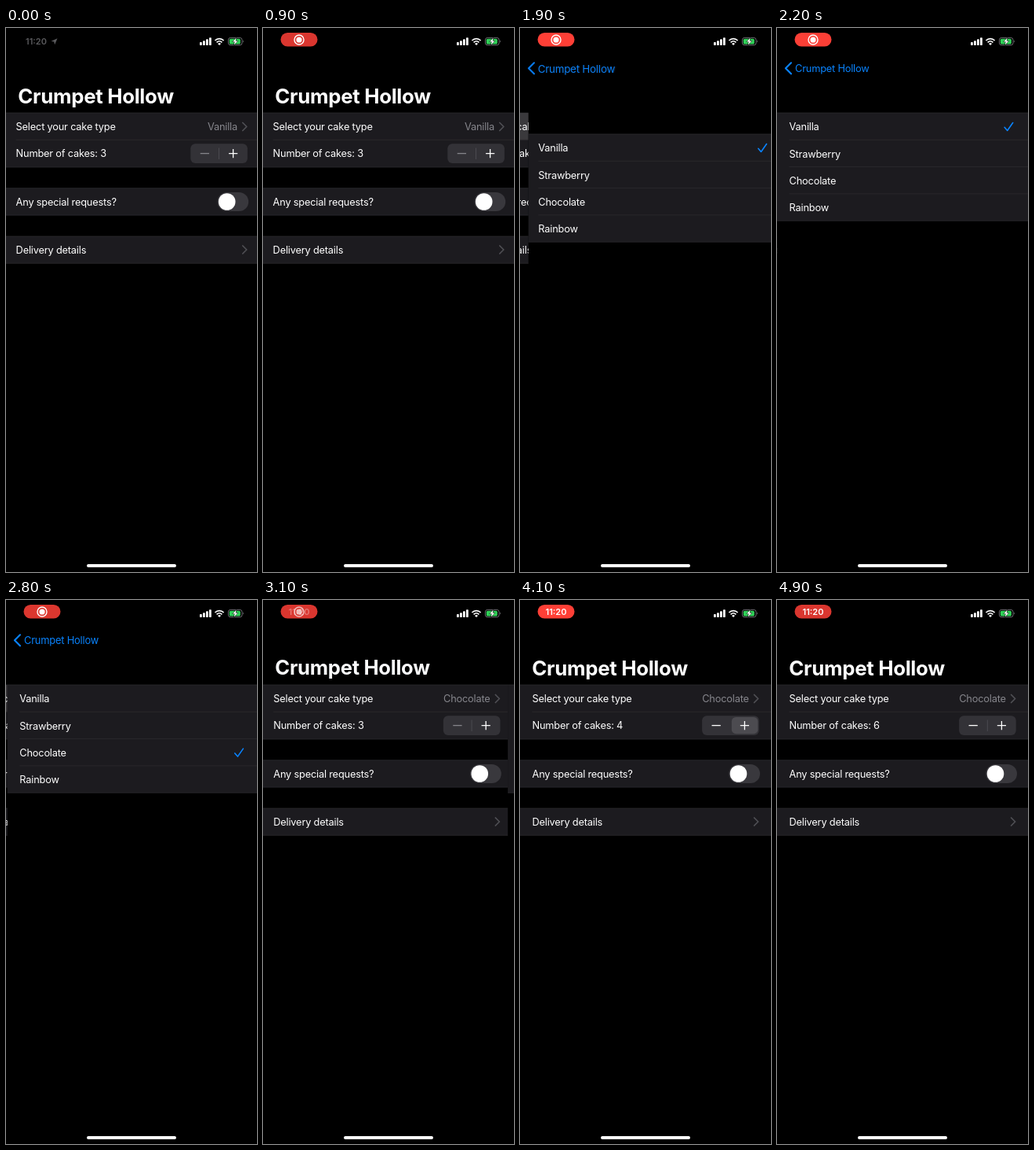
Animation of 320 by 692 pixels, one loop 5 s. Source, as an HTML page:

```html
<!DOCTYPE html>
<html lang="en">
<head>
<meta charset="utf-8">
<title>Cake order</title>
<style>
  html, body { margin: 0; width: 100%; height: 100%; overflow: hidden; background: #000; }
  svg { display: block; width: 100vw; height: 100vh; }
  text { font: 400 12.8px Inter, "Liberation Sans", sans-serif; letter-spacing: -.2px; fill: #fff; }
  .card { fill: #1c1b1f; }
  .line { stroke: #2c2b2f; stroke-width: .8; }
  .lit { fill: #3a393c; }
  .grey { fill: #86868c; }
  .chev { fill: none; stroke: #4f4f54; stroke-width: 1.7; stroke-linecap: round; stroke-linejoin: round; }
  .blue { fill: none; stroke: #0a84ff; stroke-linecap: round; stroke-linejoin: round; }
  #big { font-size: 25.8px; font-weight: 700; letter-spacing: -.3px; }
  #small { fill: #0a84ff; }
  .clock { font-size: 11px; font-weight: 600; letter-spacing: 0; text-anchor: middle; }
</style>
</head>
<body>
<svg viewBox="0 0 320 692" preserveAspectRatio="none">
  <rect width="320" height="692"/>

  <g id="main">
    <g id="cards"></g>
    <rect id="rowLit" class="lit" y="108" width="320" height="34.3"/>
    <g id="left">
      <path class="line" d="M0 142.3H340"/>
      <text y="130.2">Select your cake type</text>
      <text id="count" y="164.4"></text>
      <text y="225.7">Any special requests?</text>
      <text y="287">Delivery details</text>
    </g>
    <g id="right">
      <text id="cake" class="grey" x="295" y="130.2" text-anchor="end"></text>
      <path class="chev" d="M301.8 120.5l5 5-5 5M301.8 277l5 5-5 5"/>
      <rect x="235.3" y="147.3" width="72.6" height="24.6" rx="6" fill="#333237"/>
      <rect id="press" x="273" y="149" width="33.5" height="21.2" rx="5.5" fill="#4c4b50"/>
      <path id="divider" d="M271.5 152.5V167" stroke="#4b4a50" stroke-width="1"/>
      <path id="minus" d="M247.7 159.6H259" stroke-width="1.3"/>
      <path d="M284 159.6H295.2M289.6 154V165.2" stroke="#fff" stroke-width="1.3"/>
      <rect x="269.5" y="208.9" width="39.7" height="24.2" rx="12.1" fill="#39383d"/>
      <circle cx="281.7" cy="221" r="10.8" fill="#fff"/>
    </g>
  </g>

  <g id="picker">
    <rect y="95" width="320" height="597"/>
    <g id="list">
      <rect class="card" y="108" width="320" height="137.2"/>
      <path class="line" d="M0 108H320M0 245.2H320"/>
      <rect id="optionLit" class="lit" y="176.6" width="320" height="34.3"/>
      <g id="options"></g>
      <path id="check" class="blue" stroke-width="1.6" d="M290 126.3l3.6 4.2 7-10"/>
    </g>
  </g>

  <path id="back" class="blue" stroke-width="2.2" d="M18 44.3l-7 7 7 7"/>
  <text id="big">Crumpet Hollow</text>
  <text id="small">Crumpet Hollow</text>

  <g id="idle" fill="#5a5a5d">
    <text class="clock" x="38.5" y="21.2" style="fill:#5a5a5d">11:20</text>
    <path d="M65.5 13.2l-3.4 8-.9-3.6-3.6-.9z"/>
  </g>
  <g id="pill">
    <rect id="red" x="22.5" y="6" width="47" height="17.6" rx="8.8" fill="#ff4037"/>
    <text id="time" class="clock" x="46" y="18.9">11:20</text>
    <g id="rec">
      <circle cx="46" cy="15" r="6" fill="none" stroke="#fff" stroke-width="1.4"/>
      <circle cx="46" cy="15" r="3.6" fill="#fff"/>
    </g>
  </g>

  <g fill="#fff">
    <rect x="247" y="18" width="2.8" height="4" rx=".7"/>
    <rect x="251" y="16.3" width="2.8" height="5.7" rx=".7"/>
    <rect x="255" y="14.3" width="2.8" height="7.7" rx=".7"/>
    <rect x="259" y="12.2" width="2.8" height="9.8" rx=".7"/>
    <path d="M272 22l-2-2.1a2.9 2.9 0 0 1 4 0z"/>
    <path d="M268.6 18.3a4.9 4.9 0 0 1 6.8 0M266.4 16a8 8 0 0 1 11.2 0"
      fill="none" stroke="#fff" stroke-width="1.7"/>
  </g>
  <rect x="283.4" y="12.4" width="17.6" height="9.4" rx="2.8" fill="none" stroke="#77777b" stroke-width=".9"/>
  <path d="M302.3 15.6a1.8 1.8 0 0 1 0 3z" fill="#77777b"/>
  <rect x="284.8" y="13.8" width="14" height="6.6" rx="1.5" fill="#30d158"/>
  <path d="M293.6 12.6l-4.6 5h2.7l-1 4 4.8-5.2h-2.8z" fill="#fff" stroke="#000" paint-order="stroke"/>
  <rect x="103" y="682" width="114" height="4" rx="2" fill="#fff"/>
</svg>
<script>
const el = {};
document.querySelectorAll('[id]').forEach(e => el[e.id] = e);
const ROW = 34.3, PUSH = 1614, POP = 2794;

el.cards.innerHTML = [[108, 69], [203.8, ROW], [265, ROW]].map(([y, h]) =>
  `<rect class="card" y="${y}" width="320" height="${h}"/>
   <path class="line" d="M0 ${y}H320M0 ${y + h}H320"/>`).join('');
el.options.innerHTML = ['Vanilla', 'Strawberry', 'Chocolate', 'Rainbow'].map((name, i) =>
  `<text y="${130.2 + ROW * i}">${name}</text>` +
  (i ? `<path class="line" d="M0 ${108 + ROW * i}H320"/>` : '')).join('');

const clamp = v => Math.max(0, Math.min(1, v));
const mix = (a, b, k) => a + (b - a) * k;
const fade = (e, v) => e.setAttribute('opacity', v);
const move = (e, x, y = 0, s = 1) =>
  e.setAttribute('transform', `translate(${x} ${y}) scale(${s})`);

// Remaining distance of a critically damped spring
function spring(ms) {
  const k = Math.max(0, ms) * .01826;
  return Math.exp(-k) * (1 + k);
}

function draw(t) {
  const popping = t >= POP, settled = t >= 2100, picked = t >= 2700;
  const p = popping ? spring(t - POP) : 1 - spring(t - PUSH);
  const inset = settled ? 15.5 : 12.6;

  // Order form
  move(el.main, -90 * p);
  move(el.left, inset);
  move(el.right, settled ? -3.2 : 0);
  fade(el.rowLit, popping ? p : +(t >= 1500));
  const presses = [4000, 4300, 4600];
  const count = 3 + presses.filter(at => t >= at).length;
  const pressed = presses.some(at => t >= at && t < at + 200);
  el.count.textContent = 'Number of cakes: ' + count;
  el.cake.textContent = picked ? 'Chocolate' : 'Vanilla';
  el.minus.setAttribute('stroke', count > 3 ? '#fff' : '#85848a');
  fade(el.press, +pressed);
  fade(el.divider, +!pressed);

  // Cake list
  el.picker.style.display = p < .0005 ? 'none' : '';
  move(el.picker, 320 * (1 - p));
  move(el.list, 0, settled ? 0 : 27);
  move(el.options, inset);
  move(el.check, settled ? 0 : 3, picked ? 2 * ROW : 0);
  fade(el.optionLit, +(t >= 2600 && !popping));

  // Large title shrinking into the back button
  const q = p ** 1.18, x = mix(15.2, 23, q), y = mix(96, 55.8, q), w = mix(198, 96, q);
  move(el.big, x, y, w / 198);
  move(el.small, x, y, w / 96);
  fade(el.big, 1 - q);
  fade(el.small, q);
  fade(el.back, clamp((p - .6) / .4));

  // Recording indicator
  const toTime = clamp((t - 2950) / 450);
  fade(el.idle, clamp(1 - t / 300));
  fade(el.pill, clamp(t / 400));
  fade(el.red, .925 + .075 * Math.cos((t - 2000) / 1000 * Math.PI));
  fade(el.time, toTime);
  fade(el.rec, 1 - toTime);
}

const start = performance.now();
function tick() {
  const t = (performance.now() - start) % 5000;
  draw(Math.floor(t / 100) * 100);
  requestAnimationFrame(tick);
}
tick();
</script>
</body>
</html>
```
